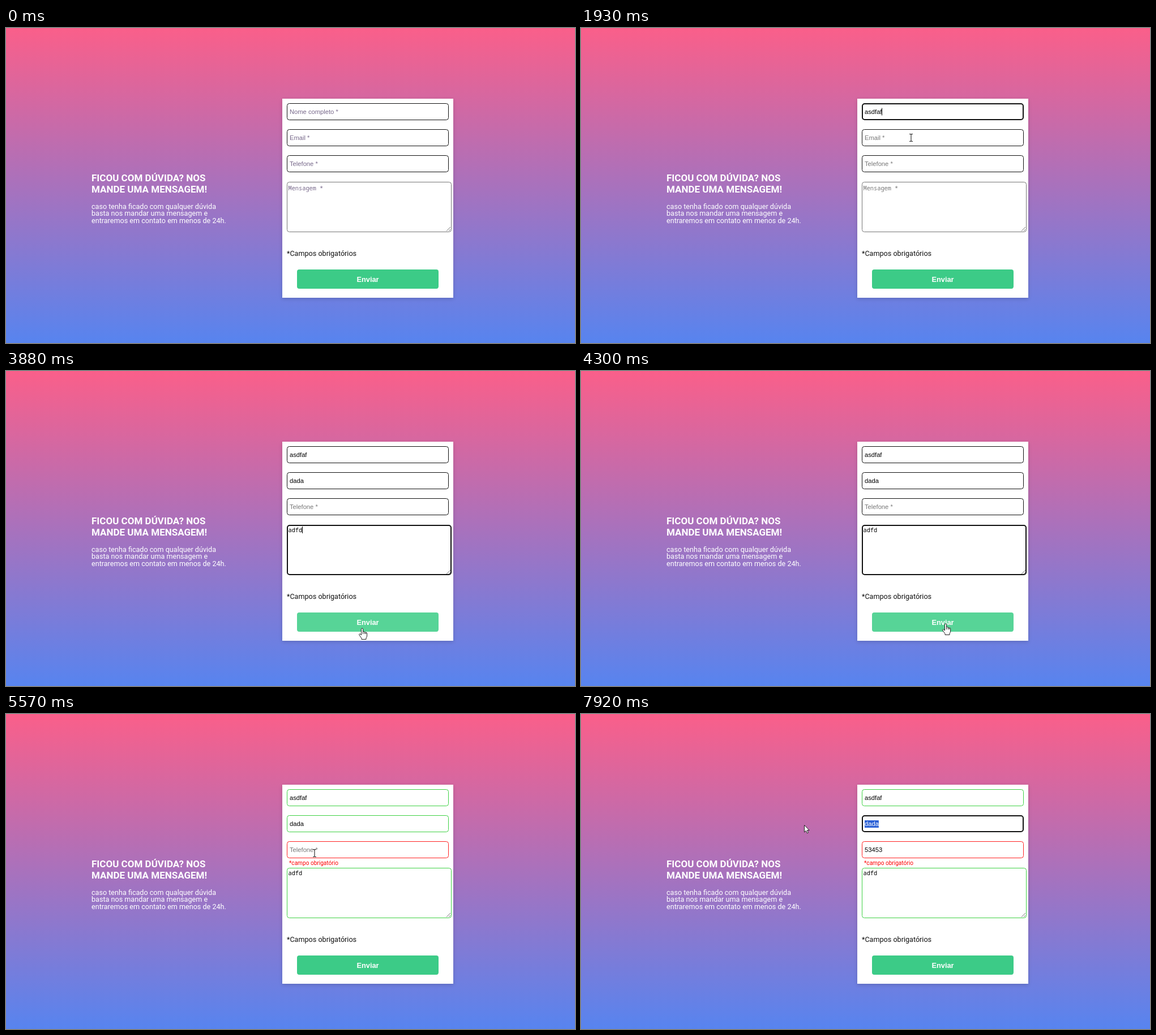
Animation of 1005x557 px, one loop 8000 ms. Source, as an HTML page:

```html
<!DOCTYPE html>
<html lang="pt">
<head>
<meta charset="utf-8">
<title>Formulário de contato</title>
<style>
html, body { margin: 0; width: 100%; height: 100%; overflow: hidden; }
svg { display: block; width: 1005px; height: 557px; background: linear-gradient(#fa5f8a, #5784ef); }
text { font-family: Roboto, sans-serif; white-space: pre; }
.title { font-size: 17px; font-weight: 700; fill: #fff; }
.body { font-size: 12.6px; }
.field { font: 11.2px "Liberation Sans", Arial, sans-serif; }
.mono { font: 10.3px "Noto Sans Mono", monospace; }
.send { font: bold 12.8px "Liberation Sans", Arial, sans-serif; fill: #fff; }
.error { font-size: 10.1px; fill: #f00; }
.card { filter: drop-shadow(0 2px 3px rgba(0, 0, 0, .16)); }
</style>
</head>
<body>
<svg viewBox="0 0 1005 557">
  <text class="title" x="151" y="271">FICOU COM DÚVIDA? NOS</text>
  <text class="title" x="151" y="291">MANDE UMA MENSAGEM!</text>
  <g fill="#fff">
    <text class="body" x="151" y="319.5">caso tenha ficado com qualquer dúvida</text>
    <text class="body" x="151" y="332.3">basta nos mandar uma mensagem e</text>
    <text class="body" x="151" y="345">entraremos em contato em menos de 24h.</text>
  </g>
  <rect class="card" x="488" y="125" width="302" height="352" fill="#fff"/>
  <text class="body" x="496" y="403" fill="#111">*Campos obrigatórios</text>
  <rect id="button" x="514" y="427" width="250" height="34" rx="4"/>
  <text class="send" x="639" y="449" text-anchor="middle">Enviar</text>
  <g id="form"></g>
  <path d="M778 359l7-7M782 359l3-3" stroke="#777"/>
  <g id="pointer"></g>
</svg>
<script>
const LOOP = 8000, SUBMIT = 4490;
const $ = id => document.getElementById(id);
const pen = document.createElement('canvas').getContext('2d');

// Pointer path: time, x, y
const path = [
  [200, 922, 548], [950, 558, 163], [1020, 562, 148], [1700, 562, 148],
  [1800, 580, 164], [1870, 582, 185], [1930, 583, 194], [2600, 583, 194],
  [2810, 588, 310], [3530, 588, 310], [4020, 640, 491], [4300, 645, 447],
  [4960, 645, 447], [5570, 545, 246], [5710, 548, 239], [5780, 548, 239],
  [5850, 548, 233], [7050, 548, 233], [7330, 546, 187], [7790, 399, 194],
  [7860, 394, 196]
];
const presses = [[1090, 1160], [2280, 2350], [3070, 3140], [4360, SUBMIT], [5780, 5850], [7330, 7920]];

// keys holds the time at which each character appears
const every = (start, step, n) => Array.from({ length: n }, (_, i) => start + i * step);
const fields = [
  { y: 133, w: 285, h: 29, hint: 'Nome completo *', value: 'asdfaf', keys: every(1240, 78, 6), focus: [[1090, 2280]] },
  { y: 179, w: 285, h: 29, hint: 'Email *', value: 'dada', keys: every(2360, 75, 4), focus: [[2280, 3070], [7330, LOOP]] },
  { y: 225, w: 285, h: 29, hint: 'Telefone *', value: '53453', keys: every(6380, 117, 5), focus: [[5780, 7330]], wrong: true },
  { y: 272, w: 290, h: 88, hint: 'Mensagem *', value: 'adfd', keys: [3160, 3250, 3340, 3530], focus: [[3070, 4360]], area: true }
];
const during = (spans, t) => spans.some(([a, b]) => t >= a && t < b);

function pointerAt(t) {
  const i = path.findIndex(k => k[0] > t);
  if (i < 0) return path[path.length - 1].slice(1);
  const [t0, x0, y0] = path[i - 1], [t1, x1, y1] = path[i];
  const steps = Math.max(1, Math.round((t1 - t0) / 68));
  const p = Math.floor((t - t0) / (t1 - t0) * steps) / steps;
  const e = p * p * (3 - 2 * p);
  return [x0 + (x1 - x0) * e, y0 + (y1 - y0) * e].map(Math.round);
}

function textWidth(s, area) {
  pen.font = area ? '10.3px "Noto Sans Mono", monospace' : '11.2px "Liberation Sans", Arial, sans-serif';
  return pen.measureText(s).width;
}

function drawField(f, t, dragX) {
  const focused = during(f.focus, t);
  const typed = f.value.slice(0, f.keys.filter(k => t >= k).length);
  const left = f.area ? 498.5 : 501;
  const base = f.area ? (typed ? 285 : 287) : f.y + 19;
  const cls = f.area ? 'mono' : 'field';
  const idle = f.area ? '#777' : '#111';
  const color = focused ? '#111' : t < SUBMIT ? idle : f.wrong ? '#f22' : '#3fd145';
  const inset = focused ? 1 : .5, trim = focused ? 1 : 0;
  let out = `<rect x="${496 + inset}" y="${f.y + inset}" width="${f.w - trim}" height="${f.h - trim}"
    rx="4" fill="#fff" stroke="${color}" stroke-width="${focused ? 2 : 1}"/>`;
  const hintColor = t < 1020 ? '#77688a' : '#777';
  out += `<text class="${cls}" x="${left}" y="${base}" fill="${typed ? '#000' : hintColor}">${typed || f.hint}</text>`;

  const end = left + textWidth(typed, f.area);
  let start = end;
  if (dragX !== null && focused) {
    let n = typed.length;
    while (n && left + textWidth(typed.slice(0, n)) - 3 > dragX) n--;
    start = left + textWidth(typed.slice(0, n));
    if (n < typed.length) {
      out += `<rect x="${start}" y="${f.y + 9}" width="${end - start}" height="13" fill="#2b61d6"/>
        <text class="${cls}" x="${start}" y="${base}" fill="#fff">${typed.slice(n)}</text>`;
    }
  }
  const blinkOff = f.area && t > 3900;
  if (focused && start === end && !blinkOff) {
    const top = f.area ? 275 : f.y + 8.5;
    out += `<rect x="${Math.round(end)}" y="${top}" width="1" height="${f.area ? 12 : 13}"/>`;
  }
  if (f.wrong && t >= SUBMIT) out += '<text class="error" x="500" y="267">*campo obrigatório</text>';
  return out;
}

const shapes = {
  arrow: '<path d="M.5 .5V13L3.4 10.3L5.3 14.8L7.4 13.9L5.5 9.5H9.2Z" fill="#fff" stroke="#222"/>',
  beam: '<path d="M-3 -6.5H-1L0 -5.5L1 -6.5H3M0 -5.5V5.5M-3 6.5H-1L0 5.5L1 6.5H3" fill="none" stroke="#222" stroke-width="1.1"/>',
  hand: `<path d="M-2.5 12V1.5Q-2.5 0 -1 0T.5 1.5V6.5Q1 5.5 2.2 5.7T3.4 7Q4.5 6.2 5.5 7.4Q7.6 6.8 7.6 9V13
    Q7.6 15.5 6 17V19.5H-2V17.5L-6 12Q-6.8 10.3 -5.5 9.8T-2.5 12Z" fill="#fff" stroke="#222"/>
    <path d="M.5 6.5V10M3.4 7V10M5.5 7.4V10" stroke="#222"/>`
};

function draw(t) {
  const visible = t >= 200;
  const [x, y] = visible ? pointerAt(t) : [-50, -50];
  const pressed = during(presses, t);
  const dragging = t >= 7330;
  const hover = x >= 514 && x < 764 && y >= 427 && y < 461;
  const overField = fields.some(f => x >= 496 && x < 496 + f.w && y >= f.y && y <= f.y + f.h);
  const kind = hover ? 'hand' : overField || dragging && pressed ? 'beam' : 'arrow';

  $('button').setAttribute('fill', hover ? '#57d497' : '#3ccb87');
  $('form').innerHTML = fields.map(f => drawField(f, t, dragging ? x : null)).join('');
  $('pointer').innerHTML = visible ? `<g transform="translate(${x} ${y})">
    ${pressed ? '<circle cx="-1.5" r="10" fill="#ffff50" opacity=".75"/>' : ''}${shapes[kind]}</g>` : '';
}

let began;
function tick(now) {
  began ??= now;
  draw((now - began) % LOOP);
  requestAnimationFrame(tick);
}
draw(0);
requestAnimationFrame(tick);
</script>
</body>
</html>
```
